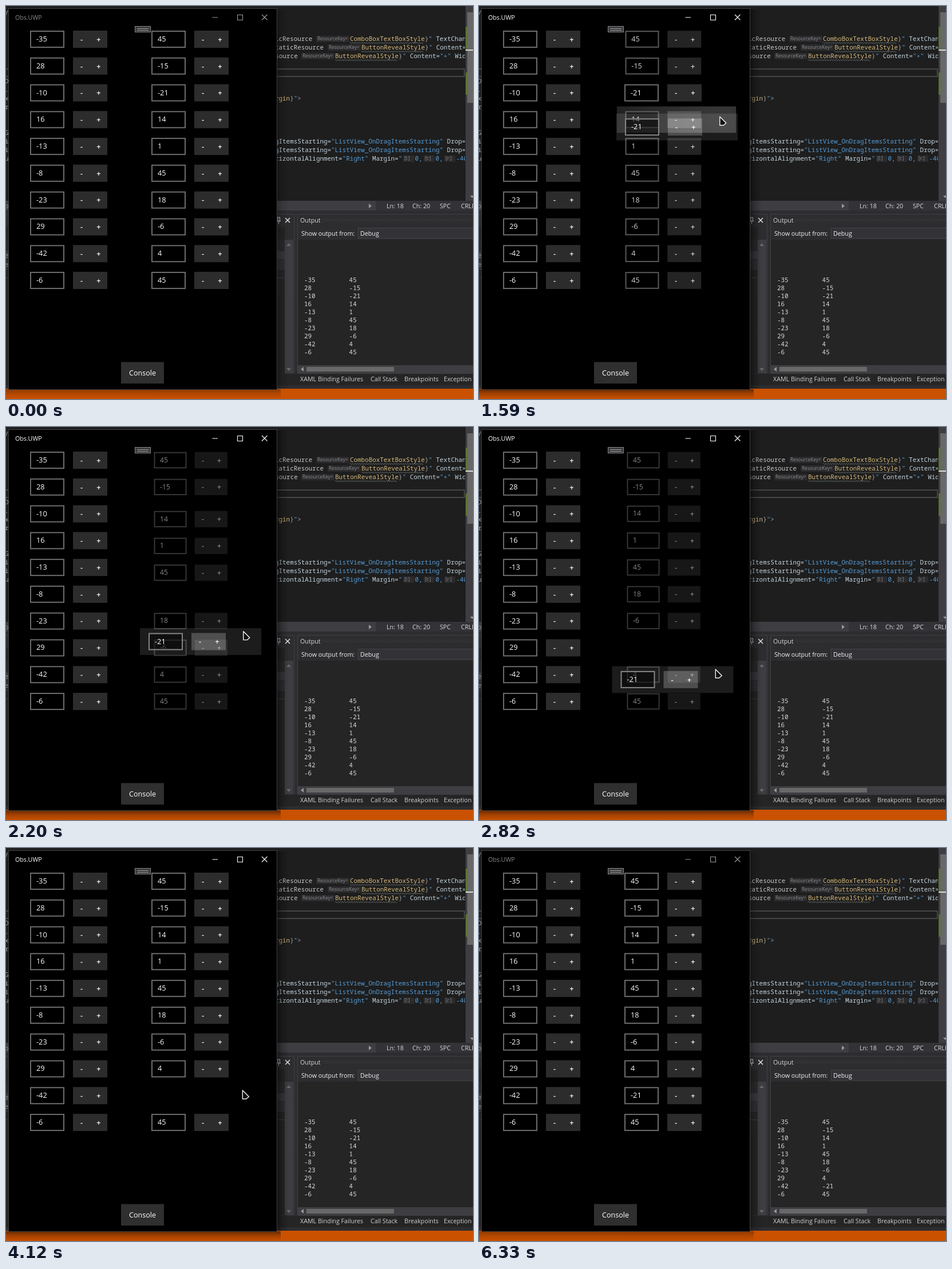
Write an HTML page that moves like this. It is 816x686 px and loops after 6470 ms.

```html
<!DOCTYPE html>
<html lang="en">
<head>
<meta charset="utf-8">
<title>Reorder list</title>
<style>
  html, body { margin: 0; width: 100%; height: 100%; overflow: hidden; background: #1e1e1e; }
  svg { display: block; width: 816px; height: 686px; }
  text { font-family: "Open Sans", "Noto Sans", sans-serif; font-size: 10.7px; white-space: pre; }
  .code { font-family: "Noto Sans Mono", "DejaVu Sans Mono", monospace; font-size: 10.9px; }
  .hint { font-size: 8.2px; fill: #8c8c90; }
  .val { font-size: 12.8px; font-weight: 500; fill: #fff; }
  .sign { font-size: 12.8px; font-weight: 600; fill: #fff; text-anchor: middle; }
</style>
</head>
<body>
<svg id="stage" viewBox="0 0 816 686">
  <defs>
    <radialGradient id="glow" gradientUnits="userSpaceOnUse" r="86">
      <stop offset="0" stop-color="#fff" stop-opacity=".5"/>
      <stop offset=".5" stop-color="#fff" stop-opacity=".26"/>
      <stop offset="1" stop-color="#fff" stop-opacity="0"/>
    </radialGradient>
    <radialGradient id="hover" gradientUnits="userSpaceOnUse" r="190">
      <stop offset="0" stop-color="#fff" stop-opacity=".22"/>
      <stop offset="1" stop-color="#fff" stop-opacity=".13"/>
    </radialGradient>
    <linearGradient id="shade">
      <stop offset="0" stop-opacity=".5"/>
      <stop offset=".45" stop-opacity=".2"/>
      <stop offset="1" stop-opacity="0"/>
    </linearGradient>
    <linearGradient id="shadeDown" href="#shade" x2="0" y2="1"/>
    <clipPath id="editorClip"><rect width="802" height="340"/></clipPath>
    <clipPath id="outputClip"><rect x="511" y="409" width="305" height="217"/></clipPath>
    <pattern id="grip" width="4" height="4" x="553" y="371" patternUnits="userSpaceOnUse">
      <path d="M0 0h1v1h-1zM2 2h1v1h-1z" fill="#4a4a4e"/>
    </pattern>
  </defs>
</svg>
<script>
const LOOP = 6470, PITCH = 46.78, MID = 345;
const LEFT = [-35, 28, -10, 16, -13, -8, -23, 29, -42, -6];
const BEFORE = [45, -15, -21, 14, 1, 45, 18, -6, 4, 45];
const AFTER = [45, -15, 14, 1, 45, 18, -6, 4, -21, 45];
const DRAGGED = 2, DROP_SLOT = 8;

const stage = document.getElementById('stage');

function el(tag, attrs, parent = stage, text) {
  const node = document.createElementNS('http://www.w3.org/2000/svg', tag);
  set(node, attrs);
  if (text !== undefined) node.textContent = text;
  return parent.appendChild(node);
}
function set(node, attrs) {
  for (const k in attrs) node.setAttribute(k, attrs[k]);
}
const rect = (x, y, width, height, fill, parent, more) =>
  el('rect', { x, y, width, height, fill, ...more }, parent);
const label = (x, y, text, fill, parent, cls = '') =>
  el('text', { x, y, fill, class: cls }, parent, text);
const path = (d, attrs, parent) => el('path', { d, fill: 'none', ...attrs }, parent);

const clamp = v => Math.max(0, Math.min(1, v));
const ramp = (t, start, length) => clamp((t - start) / length);
const easeOut = p => 1 - (1 - p) ** 3;
const slotY = slot => 58 + PITCH * slot;

// --- editor behind the window ---
const ATTR = '#c3d3dd', BLUE = '#569cd6', TAN = '#d7ba7d', DIM = '#a0a0a0';

function code(x, y, parts, parent) {
  const line = el('text', { x, y, class: 'code' }, parent);
  for (const [text, fill] of parts) el('tspan', { fill }, line, text);
}
function hint(x, y, width, text, parent) {
  rect(x, y - 9, width, 11, '#2b2b2d', parent, { rx: 1 });
  label(x + 2, y - 1, text, '', parent, 'hint');
}
function wave(x, y, width, parent) {
  path(`M${x} ${y}` + 'q1 -2.4 2 0t2 0'.repeat(width / 4),
    { stroke: '#7d8a88', 'stroke-width': .7 }, parent);
}
function resource(y, start, head, hintX, nameX, name, tail, parent) {
  code(start, y, [[head, '#c8c8c8']], parent);
  hint(hintX, y, 58, 'ResourceKey=', parent);
  code(nameX, y, [[name, TAN], ['}', DIM], ...tail], parent);
  wave(nameX, y + 3.5, name.length * 6.54, parent);
}

function drawEditor() {
  rect(0, 0, 816, 686, '#2d2d30');
  rect(0, 0, 803, 340, '#1e1e1e');
  const g = el('g', { 'clip-path': 'url(#editorClip)' });
  rect(-2, 110, 803, 13, 'none', g, { stroke: '#464646', 'stroke-width': 2 });
  resource(61, 470, 'icResource', 542, 601, 'ComboBoxTextBoxStyle', [['"', BLUE], [' TextChanged', ATTR]], g);
  resource(76, 470, 'taticResource', 562, 621, 'ButtonRevealStyle', [['"', BLUE], [' Content=', ATTR]], g);
  resource(91, 470.5, 'source', 516, 575, 'ButtonRevealStyle',
    [['"', BLUE], [' Content=', ATTR], ['"+"', BLUE], [' Width', ATTR]], g);
  code(470, 165, [['rgin', TAN], ['}', DIM], ['"', BLUE], ['>', DIM]], g);
  for (const y of [240, 255])
    code(470, y, [['gItemsStarting=', ATTR], ['"ListView_OnDragItemsStarting"', BLUE], [' Drop=', ATTR]], g);
  code(470, 270, [['rizontalAlignment=', ATTR], ['"Right"', BLUE], [' Margin=', ATTR], ['"', BLUE]], g);
  [['[l:]', 694], ['[t:]', 730], ['[r:]', 766]].forEach(([text, x], i) => {
    hint(x, 270, 19, text, g);
    code(x + 20.5, 270, [[i < 2 ? '0,' : '-40', BLUE]], g);
  });
  // slivers of code left of the window
  [['/', 16], ['D', 135], ['.', 150], ['x', 165], ['r', 180], ['G', 225], ['i', 240], ['i', 255], ['u', 270]]
    .forEach(([ch, y]) => label(-2, y, ch, DIM, g, 'code'));

  // vertical scroll bar
  rect(803, 0, 13, 340, '#3e3e42');
  rect(806, 11, 10, 158, '#686868');
  rect(803, 36, 3, 40, '#577430');
  rect(803, 116, 3, 39, '#577430');
  rect(803, 76, 13, 2, '#dcdcdc');
  path('M811 331h7l-3.500 4z', { fill: '#999' });
  // editor footer
  rect(0, 340, 816, 17, '#333337');
  rect(0, 340, 646, 17, '#3e3e42');
  path('M634 345v8l5 -4z', { fill: '#999' });
  [[665, 'Ln: 18'], [710, 'Ch: 20'], [758, 'SPC'], [795, 'CRLF']]
    .forEach(([x, s]) => label(x, 353, s, '#d8d8d8'));
}

// --- docked panels ---
function drawPanels() {
  rect(0, 386, 487, 255, '#252526');
  rect(0, 408, 487, 20, '#2a2a2c');
  rect(0, 428, 487, 14, '#38383b');
  rect(0, 443, 487, 15, '#2f2f32');
  rect(0, 459, 487, 1, '#3f3f46');
  rect(0, 474, 487, 1, '#3f3f46');
  rect(487, 408, 15, 233, '#3e3e42');
  path('M490 419h8l-4 -5z M490 632h8l-4 5z', { fill: '#686868' });
  path('M474 369h5M475 369v6M478.500 369v6M472 375.500h8M476.500 376v4', { stroke: '#d0d0d0' });
  path('M488 370l8 8m0 -8l-8 8', { stroke: '#e6e6e6', 'stroke-width': 1.5 });
  [[353, 'o'], [439, 'e'], [455, 'e'], [655, 'e']].forEach(([y, s]) => label(-2, y, s, '#999'));

  path('M0 363.500H503.500V641M816 363.500H509.500V641', { stroke: '#3f3f46' });
  label(514, 378, 'Output', '#d8d8d8');
  rect(553, 371, 263, 6, 'url(#grip)');
  label(516, 401, 'Show output from:', '#f1f1f1');
  rect(615.5, 387.500, 210, 18, '#333337', stage, { stroke: '#434346' });
  label(619, 401, 'Debug', '#f1f1f1');
  rect(510, 408, 306, 219, '#252526');
  rect(510, 627, 306, 15, '#3e3e42');
  rect(525, 630, 153, 8, '#686868');
  path('M520 630v8l-5 -4z', { fill: '#999' });
  rect(0, 642, 816, 20, '#252526');
  [[514, 'XAML Binding Failures'], [637, 'Call Stack'], [696, 'Breakpoints'], [765, 'Exception']]
    .forEach(([x, s]) => label(x, 655, s, '#d0d0d0'));
  rect(0, 668, 816, 18, '#ca5100');
}

function drawOutput() {
  const g = el('g', {}, el('g', { 'clip-path': 'url(#outputClip)' }));
  [BEFORE, AFTER].forEach((list, block) => list.forEach((v, i) => {
    const y = 482 + 14 * (i + 15 * block);
    label(521, y, LEFT[i], '#dcdcdc', g, 'code');
    label(599.6, y, v, '#dcdcdc', g, 'code');
  }));
  return g;
}

// --- app window ---
function drawRow(value, parent, lifted) {
  const g = el('g', {}, parent);
  rect(-90, -14, 58, 28, '#000', g,
    { 'fill-opacity': .5, stroke: lifted ? '#858585' : '#6c6c6c', 'stroke-width': 2 });
  label(-80, 4, value, '', g, 'val');
  const pad = rect(-16, -15, 60, 30, lifted ? '#fff' : '#2c2c2c', g, lifted ? { opacity: .22 } : {});
  label(-1, 4.8, '-', '', g, 'sign');
  label(29, 4.8, '+', '', g, 'sign');
  return { g, pad };
}
const place = (node, x, y, scale = 1) =>
  set(node, { transform: `translate(${x} ${y}) scale(${scale})` });

drawEditor();
drawPanels();
const output = drawOutput();

const shadow = el('g');
rect(473, 6, 21, 662, 'url(#shade)', shadow);
rect(0, 669, 480, 17, 'url(#shadeDown)', shadow);
rect(4.5, 4.5, 469, 665, '#000', stage, { stroke: '#3f3f3f' });
const title = label(16, 24, 'Obs.UWP');
const buttons = path('M360.500 20h9.500M404.500 15.500h9v9h-9zM447 15l9.500 9.500m0 -9.500l-9.500 9.500', { 'stroke-width': 1.1 });
rect(201, 621.500, 75, 37.500, '#2f2f2f');
el('text', { x: 238.5, y: 644.5, 'text-anchor': 'middle', class: 'val', style: 'font-size:12.5px' }, stage, 'Console');
LEFT.forEach((v, i) => place(drawRow(v, stage).g, MID - 212, slotY(i)));

const hoverBox = rect(0, 0, 0, 0, 'url(#hover)');
const rows = BEFORE.map(v => drawRow(v, stage));
const lights = BEFORE.map(() => {
  const g = el('g');
  for (const x of [329, 359])
    rect(x + .5, -14.5, 29, 29, 'url(#glow)', g,
      { 'fill-opacity': .22, stroke: 'url(#glow)', 'stroke-width': 1 });
  return g;
});
rect(225.5, 35.500, 27, 10, '#3a3a3d', stage, { stroke: '#858585' });
path('M229 39.500h20M229 42.500h20', { stroke: '#a0a0a0' });

const lifted = el('g');
rect(-106, -23.4, 212, 46.8, '#fff', lifted, { opacity: .11 });
drawRow(BEFORE[DRAGGED], lifted, true);
const pointer = path('M0 0V15H6.500L11 11Z',
  { fill: '#111', stroke: '#f4f4f4', 'stroke-width': 1.4, 'stroke-linejoin': 'round' });

// --- motion ---
// time, x, y
const TRACK = [
  [120, 812, 690], [760, 406, 150], [810, 403, 125.5], [1140, 419, 134], [1320, 419, 134],
  [1500, 419, 158], [1590, 420, 192.500], [1960, 417, 300], [2200, 414, 356],
  [2640, 412.5, 422.500], [5400, 412.5, 422.500], [5830, 830, 692]
];

function pointerAt(t) {
  const i = TRACK.findIndex(k => k[0] > t);
  if (i < 1) return [2000, 2000];
  const [t0, x0, y0] = TRACK[i - 1], [t1, x1, y1] = TRACK[i];
  let p = (t - t0) / (t1 - t0);
  if (i === 1) p = 1 - (1 - p) ** 2;
  if (i === TRACK.length - 1) p = p * p * (3 - 2 * p);
  return [x0 + (x1 - x0) * p, y0 + (y1 - y0) * p];
}

function slotAt(i, t) {
  if (i === DRAGGED) return t < 4330 ? DRAGGED : DROP_SLOT;
  if (i < 3 || i > 8) return i;
  const start = i < 6 ? 2080 : [2450, 2520, 3230][i - 6];
  return i - easeOut(ramp(t, start, i === 8 ? 400 : 290));
}

function hoveredSlot(t, x, y) {
  if (x < 239 || x > 451 || (t > 1700 && t < 5400)) return -1;
  const slot = Math.floor((y - 34.6) / PITCH);
  return slot > 9 || (t > 1480 && t < 1700 && slot === DRAGGED) ? -1 : slot;
}

function draw(t) {
  const [x, y] = pointerAt(t);
  place(pointer, x + .8, y + .5);
  for (const id of ['glow', 'hover'])
    set(document.getElementById(id), { cx: x, cy: y });

  const active = t >= 1320 && t < 6330;
  set(title, { fill: active ? '#fff' : '#8a8a8a' });
  set(buttons, { stroke: active ? '#fff' : '#9a9a9a' });
  set(shadow, { opacity: active ? 1 : .6 });

  const dim = t < 3990 ? ramp(t, 1500, 270) : t < 4120 ? .5 : 0;
  const scale = 1 - .05 * dim;
  const hovered = hoveredSlot(t, x, y);

  rows.forEach((row, i) => {
    const slot = slotAt(i, t), held = i === DRAGGED;
    const alpha = held
      ? (t < 4330 ? 1 - ramp(t, 1640, 240) : .3 + .7 * ramp(t, 4330, 120))
      : 1 - .48 * dim;
    place(row.g, MID, slotY(slot), held ? 1 : scale);
    set(row.g, { opacity: alpha });
    set(row.pad, { fill: slot === hovered ? '#5c5c5c' : '#2c2c2c' });
    place(lights[i], 0, slotY(slot));
    set(lights[i], { opacity: held && alpha < .1 ? 0 : 1 - .48 * dim });
  });

  set(hoverBox, hovered < 0 ? { width: 0 } : {
    x: MID - 106 * scale, y: slotY(hovered) - 23.4 * scale,
    width: 212 * scale, height: 46.8 * scale
  });

  set(lifted, { visibility: t >= 1480 && t < 3990 ? 'visible' : 'hidden' });
  place(lifted, x - 74, y + 18.4);

  const lines = Math.min(15, Math.floor(2.2 * Math.max(0, Math.floor((t - 4370) / 37))));
  place(output, 0, -14 * lines);
}

const began = performance.now();
function tick() {
  draw((performance.now() - began) % LOOP);
  requestAnimationFrame(tick);
}
tick();
</script>
</body>
</html>
```
